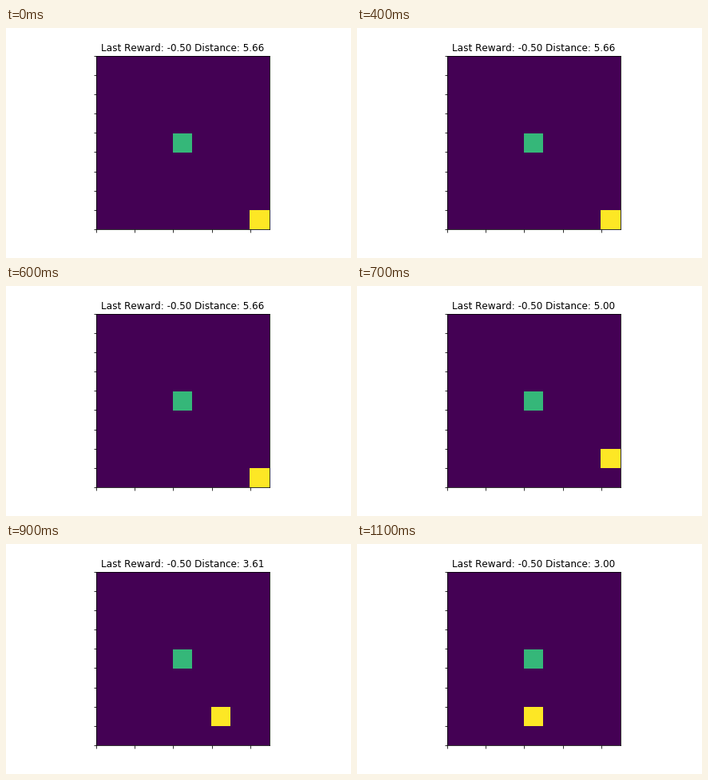
Animation of 432 by 288 pixels, one loop 10000 ms. Source, as a matplotlib script:

```python
import math

import matplotlib.pyplot as plt
from matplotlib.animation import FuncAnimation
from matplotlib.patches import Rectangle
from matplotlib.transforms import offset_copy

SIZE = 9
LAST = SIZE - 1
GOAL = (4, 4)  # column, row
STEP_MS = 100
LOOP_MS = 10000
DITHERS = 5    # up and down moves before heading left
TURN_STEP = 7

plt.rcParams.update({"font.family": "DejaVu Sans", "text.kerning_factor": 6})
viridis = plt.get_cmap("viridis")

fig, ax = plt.subplots(figsize=(6, 4), dpi=72, facecolor="white")
fig.subplots_adjust(left=0.125, right=0.9, bottom=0.125, top=0.88)
ax.set(xlim=(0, SIZE), ylim=(SIZE, 0), aspect="equal", facecolor=viridis(0.0),
       xticks=range(0, SIZE, 2), yticks=range(SIZE + 1))
ax.tick_params(labelbottom=False, labelleft=False)
title = ax.set_title("", fontsize=12)

# Nearly half a pixel back, so cell edges round down to whole pixels.
cell_space = offset_copy(ax.transData, fig, -0.48, -0.48, units="dots")


def add_cell(cell, level):
    square = Rectangle(cell, 1, 1, facecolor=viridis(level), linewidth=0,
                       transform=cell_space)
    return ax.add_patch(square)


add_cell(GOAL, 2 / 3)
agent = add_cell((LAST, LAST), 1.0)


def agent_cell(step):
    """Dither between the two bottom rows, then walk left below the goal."""
    moves = step // 2 if step < 4 else step - 2
    row = LAST - min(moves, DITHERS) % 2
    column = LAST - min(max(step - TURN_STEP, 0), LAST - GOAL[0])
    return column, row


def update(step):
    cell = agent_cell(step)
    agent.set_xy(cell)
    title.set_text(f"Last Reward: -0.50 Distance: {math.dist(cell, GOAL):.2f}")
    return agent, title


anim = FuncAnimation(fig, update, frames=LOOP_MS // STEP_MS, interval=STEP_MS,
                     repeat=True, repeat_delay=0)
plt.show()
```
